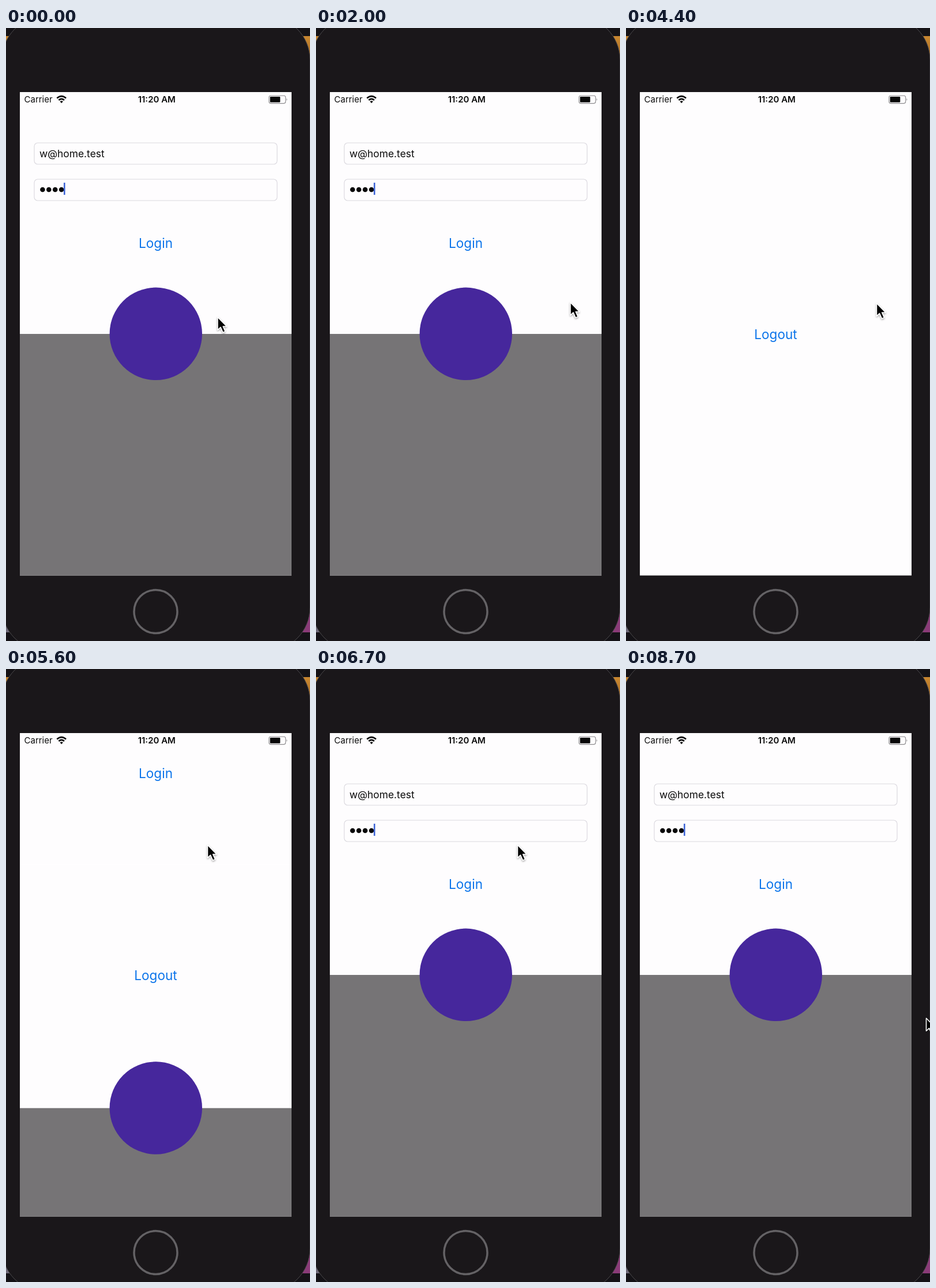
These frames come from a looping animation (527 by 1062 pixels, 8.8 s). An HTML page:

```html
<!DOCTYPE html>
<html lang="en">
<head>
<meta charset="utf-8">
<title>Login curtain</title>
<style>
  html, body { margin: 0; width: 100%; height: 100%; overflow: hidden; background: #141216; }
  svg { display: block; width: 527px; height: 1062px; }
  text { font-family: Inter, Roboto, sans-serif; fill: #0a0a0a; }
  .button { font-size: 22.6px; fill: #0b74ea; text-anchor: middle; }
  .status { font-size: 15px; }
  .field { fill: #fefdfe; stroke: #dcdae0; stroke-width: 1.2; }
</style>
</head>
<body>
<svg viewBox="0 0 527 1062">
  <defs>
    <clipPath id="screen"><rect x="24" y="111" width="471" height="837.5"/></clipPath>
    <filter id="shadow" x="-50%" y="-50%" width="200%" height="200%">
      <feDropShadow dx="0" dy="1.5" stdDeviation="1.5" flood-opacity=".4"/>
    </filter>
    <linearGradient id="dusk" x1="0" y1="0" x2="0" y2="1">
      <stop offset="0" stop-color="#c98730"/><stop offset="1" stop-color="#9a6424"/>
    </linearGradient>
  </defs>

  <!-- desktop and phone body -->
  <rect width="527" height="1062" fill="#141216"/>
  <rect y="14" width="527" height="60" fill="url(#dusk)"/>
  <rect y="990" width="260" height="57" fill="#6d6878"/>
  <rect x="260" y="990" width="267" height="57" fill="#8a3b78"/>
  <rect x="-7" y="-20" width="534" height="1099" rx="75" fill="#1a171a" stroke="#4b494c"/>
  <circle cx="259.5" cy="1011" r="37.5" fill="none" stroke="#646265" stroke-width="3.5"/>

  <g clip-path="url(#screen)">
    <rect x="24" y="111" width="471" height="838" fill="#fefdfe"/>
    <text class="button" x="259.5" y="538.5">Logout</text>

    <g id="upper">
      <rect x="24" y="111" width="471" height="419" fill="#fefdfe"/>
      <rect class="field" x="49" y="199" width="421" height="37" rx="6"/>
      <rect class="field" x="49" y="262" width="421" height="37" rx="6"/>
      <text x="58" y="223.5" font-size="17.4">w@home.test</text>
      <g id="dots"></g>
      <rect id="caret" x="100" y="268" width="2.6" height="21" fill="#3f66d6"/>
      <text class="button" x="259.5" y="381">Login</text>
    </g>

    <g id="lower">
      <rect x="24" y="530" width="471" height="420" fill="#767476"/>
      <circle cx="259.8" cy="529.8" r="80.2" fill="#46279c"/>
    </g>

    <!-- status bar -->
    <text class="status" x="31.5" y="129.3">Carrier</text>
    <text class="status" x="261.3" y="129.3" text-anchor="middle" font-weight="600">11:20 AM</text>
    <g fill="none" stroke="#080808" stroke-width="2.6">
      <path d="M88.3 121.6 Q96.2 114.6 104.1 121.6"/>
      <path d="M91.4 125 Q96.2 120.8 101 125"/>
    </g>
    <path d="M93.5 127.3 Q96.2 125.2 98.9 127.3 L96.2 130.2Z" fill="#080808"/>
    <rect x="455.9" y="117.2" width="28.8" height="13.4" rx="3" fill="none" stroke="#8b898c" stroke-width="1.1"/>
    <rect x="457.7" y="119" width="17.6" height="9.8" rx="1.2" fill="#080808"/>
    <path d="M486.4 121.7 Q488.4 123.9 486.4 126.1Z" fill="#8b898c"/>
  </g>

  <path id="cursor" d="M0 0V22L5 17.4L9 26.4L13 24.6L9.2 16H15.6Z" fill="#050505"
        stroke="#fff" stroke-width="1.5" stroke-linejoin="round" filter="url(#shadow)"/>
</svg>

<script>
  const LOOP = 8800, STEP = 100, MOVE = 1500;
  const OPEN = 2409, CLOSE = 4814;
  const RISE = 418, DROP = 503;

  // time, x, y of the pointer tip
  const POINTER = [
    [0, 367, 501], [700, 285, 375], [1000, 285, 375], [1500, 441, 475.5],
    [4100, 441, 475.5], [4400, 434.5, 477], [4750, 280, 530], [4900, 280, 530],
    [5500, 349.5, 305], [8000, 349.5, 305], [8700, 520.5, 605]
  ];

  const $ = id => document.getElementById(id);
  const clamp = v => Math.min(1, Math.max(0, v));
  const shift = (id, x, y) => $(id).setAttribute("transform", `translate(${x} ${y})`);

  // cubic-bezier(.42, 0, .58, 1)
  function ease(x) {
    let lo = 0, hi = 1;
    for (let i = 0; i < 24; i++) {
      const s = (lo + hi) / 2, r = 1 - s;
      if (3 * r * r * s * 0.42 + 3 * r * s * s * 0.58 + s * s * s < x) lo = s;
      else hi = s;
    }
    return lo * lo * (3 - 2 * lo);
  }

  function pointerAt(t) {
    const i = POINTER.findIndex(p => p[0] > t);
    if (i < 0) return POINTER[POINTER.length - 1].slice(1);
    const [t0, x0, y0] = POINTER[i - 1], [t1, x1, y1] = POINTER[i];
    const k = ease((t - t0) / (t1 - t0));
    return [x0 + (x1 - x0) * k, y0 + (y1 - y0) * k];
  }

  function draw(t) {
    const gap = ease(clamp((t - OPEN) / MOVE)) - ease(clamp((t - CLOSE) / MOVE));
    shift("upper", 0, -RISE * gap);
    shift("lower", 0, DROP * gap);
    shift("cursor", ...pointerAt(t));
    const phase = t % 1000;
    $("caret").setAttribute("opacity", phase >= 300 && phase < 600 ? 0 : 1);
  }

  $("dots").innerHTML = [0, 1, 2, 3]
    .map(i => `<circle cx="${63.4 + i * 10.9}" cy="280" r="4.3" fill="#080808"/>`).join("");

  const start = performance.now();
  function frame() {
    const t = (performance.now() - start) % LOOP;
    draw(Math.floor(t / STEP) * STEP);
    requestAnimationFrame(frame);
  }
  frame();
</script>
</body>
</html>
```
